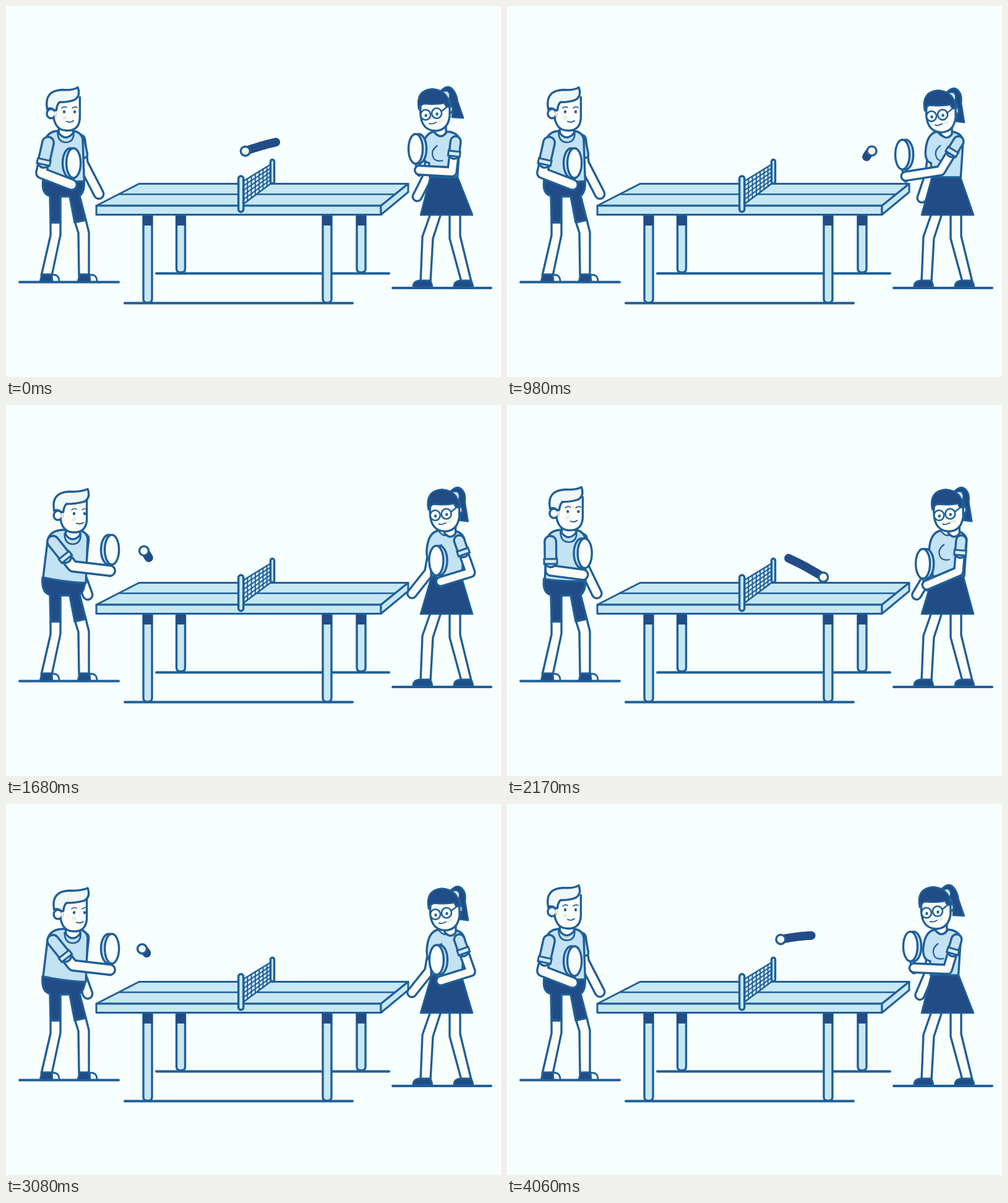
Animation, 800 px wide and 600 px high, one loop 4130 ms. Source, as an HTML page with a canvas:

```html
<!DOCTYPE html>
<html lang="en">
<head>
<meta charset="utf-8">
<title>Table tennis</title>
<style>
  html, body { margin: 0; width: 100%; height: 100%; overflow: hidden; background: #f7fefe; }
  canvas { display: block; width: 800px; height: 600px; }
</style>
</head>
<body>
<canvas id="stage" width="800" height="600"></canvas>
<script>
const ctx = document.getElementById('stage').getContext('2d');
const LOOP = 4130, STEP = 70, RALLY = LOOP / 3;
const BG = '#f7fefe', INK = '#1f5f98', DARK = '#214c86', SHIRT = '#c3e2f3', TABLE = '#c7e7f3',
      SKIN = '#fcfcf8', HAIR = '#eef8f6', WHITE = '#f8fefe', BALL = '#fff9ee';
const LINE = 3.4;

// A stroke goes from rest to strike, holds, then comes back; sway bends the way back.
const MAN = {
  begin: 0, out: 303, hold: 127, back: 550, sway: 0,
  rest: { elbow: [57, 270], hand: [106, 289], paddle: [107, 254], far: [150, 304], lean: 2 },
  strike: { elbow: [108, 261], hand: [168, 268], paddle: [169, 234], far: [132, 307], lean: 18 }
};
const GIRL = {
  begin: 593, out: 480, hold: 0, back: 640, sway: 9.5,
  rest: { elbow: [751, 271], hand: [703, 286], paddle: [698, 252], far: [656, 305], lean: 15 },
  strike: { elbow: [695, 266], hand: [638, 270], paddle: [635, 235], far: [672, 311], lean: 3 }
};
const HITS = [{ at: 430, x: 182 }, { at: 1073, x: 628 }];
const HIT_Y = 233, BOUNCE_Y = 300;

const mod = (a, n) => ((a % n) + n) % n;
const clamp = v => Math.max(0, Math.min(1, v));
const ease = u => u * u * (3 - 2 * u);
const mix = (a, b, u) => a + (b - a) * u;
const mixPoint = (a, b, u) => [mix(a[0], b[0], u), mix(a[1], b[1], u)];

function pose(player, time) {
  const { begin, out, hold, back, sway, rest, strike } = player;
  const t = mod(time - begin, RALLY), returning = t > out + hold;
  const w = returning ? 1 - ease(clamp((t - out - hold) / back)) : ease(clamp(t / out));
  const arc = Math.sin(Math.PI * w) * (returning ? 1 : -1);
  const raised = key => {
    const [x, y] = mixPoint(rest[key], strike[key], w);
    return [x, y - 12 * arc];
  };
  return {
    elbow: mixPoint(rest.elbow, strike.elbow, w),
    hand: raised('hand'),
    paddle: raised('paddle'),
    far: mixPoint(rest.far, strike.far, w),
    lean: mix(rest.lean, strike.lean, w) - sway * arc
  };
}

// One arc to the bounce, then a rebound that hovers before the next hit
function flight(time) {
  const phase = mod(time - HITS[0].at, RALLY), gap = HITS[1].at - HITS[0].at;
  const right = phase < gap;
  const [from, to] = right ? HITS : [HITS[1], HITS[0]];
  const since = right ? phase : phase - gap;
  const u = since / (right ? gap : RALLY - gap), cut = 0.62;
  const bounceX = mix(from.x, to.x, 0.81);
  if (u < cut) {
    const v = u / cut;
    return { since, spot: [mix(from.x, bounceX, v), mix(HIT_Y, BOUNCE_Y, v) - 194 * v * (1 - v)] };
  }
  const w = (u - cut) / (1 - cut), d = w - 0.5;
  return {
    since,
    spot: [mix(bounceX, to.x, 0.5 + 0.35 * d + 2.6 * d ** 3), mix(HIT_Y, BOUNCE_Y, (1 - w) ** 4)]
  };
}

function shape(d, fill, width = LINE) {
  const p = new Path2D(d);
  if (fill) { ctx.fillStyle = fill; ctx.fill(p); }
  if (width) { ctx.lineWidth = width; ctx.strokeStyle = INK; ctx.stroke(p); }
}

function dot(x, y, rx, ry, fill, width = LINE) {
  ctx.beginPath();
  ctx.ellipse(x, y, rx, ry, 0, 0, 7);
  ctx.fillStyle = fill;
  ctx.fill();
  if (width) { ctx.lineWidth = width; ctx.strokeStyle = INK; ctx.stroke(); }
}

function line(points, width, color, cap = 'round') {
  ctx.beginPath();
  points.forEach(([x, y]) => ctx.lineTo(x, y));
  ctx.lineCap = cap;
  ctx.lineWidth = width;
  ctx.strokeStyle = color;
  ctx.stroke();
  ctx.lineCap = 'round';
}

function limb(points, width, fill) {
  line(points, width, INK);
  line(points, width - 2 * LINE, fill);
}

function arm(shoulder, elbow, hand, reach, width) {
  limb([shoulder, elbow, hand], width, SKIN);
  const dx = elbow[0] - shoulder[0], dy = elbow[1] - shoulder[1], len = Math.hypot(dx, dy);
  const ux = dx / len, uy = dy / len;
  const end = [shoulder[0] + ux * reach, shoulder[1] + uy * reach];
  limb([shoulder, end], width + 2, SHIRT);
  const cuff = k => [[end[0] - uy * k, end[1] + ux * k], [end[0] + uy * k, end[1] - ux * k]];
  line(cuff(width / 2 + 2), 11, INK, 'butt');
  line(cuff(width / 2 - 1), 5, '#d6ebf6', 'butt');
}

function paddle([x, y], hand, rim) {
  limb([[x, y + 20], [hand[0], hand[1] + 6]], 9, SHIRT);
  dot(x + rim, y, 12.5, 24, SHIRT);
  dot(x - rim * 0.7, y, 11.5, 24, WHITE);
}

function tableLeg(x, foot) {
  shape(`M${x} 338V${foot - 6}Q${x} ${foot} ${x + 7} ${foot}Q${x + 14} ${foot} ${x + 14} ${foot - 6}V338Z`, TABLE);
  ctx.fillStyle = DARK;
  ctx.fillRect(x - 1, 338, 16, 17);
}

function net() {
  const top = u => [mix(384, 428, u), mix(283, 256, u)];
  const bottom = u => [mix(384, 428, u), mix(320, 287, u)];
  shape('M384 283L428 256V287L384 320Z', '#d8eef6', 2.6);
  for (let i = 1; i < 7; i++) line([top(i / 7), bottom(i / 7)], 2, INK);
  for (let i = 1; i < 5; i++) line([0, 1].map(s => mixPoint(top(s), bottom(s), i / 5)), 2, INK);
  limb([[430.5, 251.5], [430.5, 284]], 9.5, TABLE);
  limb([[379.7, 279], [379.7, 329]], 11.5, TABLE);
}

function furniture() {
  const floor = (from, to, y) => line([[from, y], [to, y]], 4, INK);
  floor(22, 182, 446.5);
  floor(625, 784, 456);
  floor(243, 619, 432.5);
  floor(192, 560, 480.5);
  for (const x of [275.5, 567]) tableLeg(x, 431);
  for (const x of [222, 512]) tableLeg(x, 480);
  shape('M215 287.5H650L606 323H146Z', TABLE, 3);
  shape('M184 304.5H629', null, 2.6);
  shape('M146 323H606V337.5H146Z', TABLE, 3);
  shape('M650 287.5V301L606 337.5V323Z', TABLE, 3);
  net();
}

function manHead(lean) {
  const turn = lean * 0.3;
  ctx.save();
  ctx.translate(lean * 0.7, lean * 0.28);
  shape('M84 194V205Q95 219 107 205V194Z', SKIN);
  shape('M82 203Q82 220 96 220Q109 219 108 203', null, 2.6);
  shape('M118 147V176Q119 201 97 201Q72 201 75 160', SKIN);
  dot(71.5, 173.5, 7, 7.5, SKIN);
  shape('M77 167Q83 173 77 180Z', SKIN, 0);
  shape(`M65 165Q60 136 90 135Q107 136 ${114 + turn} 131Q${119 + turn} 145 ${109 + turn} 151Q100 155 85 155Q81 159 80 168Q76 169 74 166Q69 164 65 166Z`, HAIR);
  ctx.translate(turn, 0);
  for (const x of [92, 109]) {
    dot(x, 170.5, 2.2, 2.6, INK, 0);
    shape(`M${x - 4} 164.5Q${x} 161 ${x + 4} 163.5`, null, 1.7);
  }
  shape('M96 186Q102 189 107 185', null, 1.9);
  dot(92, 180, 4, 3, '#e0f3ea', 0);
  ctx.restore();
}

function man(time) {
  const { elbow, hand, paddle: bat, far, lean } = pose(MAN, time);
  const l = lean / 18;
  limb([[119 + 7 * l, 216], [125 - 5 * l, 252 + 22 * l], far], 19, SKIN);
  limb([[120 + 6 * l, 216], [126 - 2 * l, 240]], 15, SHIRT);
  shape('M72 350V371L57 436H74L88 370V350Z', SKIN);
  shape('M111 348L117 367L118 436H134L134 366L129 346Z', SKIN);
  for (const x of [54, 115]) {
    shape(`M${x + 20} 435Q${x + 32} 433 ${x + 32} 446H${x + 18}Z`, SKIN, 2.8);
    shape(`M${x + 1} 446L${x + 4} 434H${x + 20}L${x + 21} 446Z`, DARK, 2.8);
  }
  shape(`M${60 - l} ${282 - 3 * l}Q57 304 71 307L72 350H88V308H103L111 350L129 346L119 307Q127 301 ${126 + 2 * l} 284Z`, DARK);
  shape(`M${62 - 2 * l} ${283 - 4 * l}L${62 + 5 * l} 221Q${64 + 5 * l} 204 ${82 + 8 * l} 202H${108 + 8 * l}Q${121 + 9 * l} 204 ${123 + 9 * l} 216L${126 + 3 * l} ${283 + 5 * l}Q90 286 ${62 - 2 * l} ${283 - 4 * l}Z`, SHIRT);
  manHead(lean);
  paddle(bat, hand, -3);
  arm([67 + 9 * l, 221], elbow, hand, 32, 20);
}

function girlHead(lean) {
  const l = lean / 15, sway = 8 * clamp(4 * l);
  ctx.save();
  ctx.translate(lean, 2.5 * clamp(l * 2));
  shape(`M703 138Q714 126 722 134Q729 141 ${731 - sway * 0.5} 155L${740 - sway} ${181 + sway * 0.6}L${722 - sway * 0.4} ${180 + sway * 0.5}Q724 158 714 145Z`, DARK, 2.6);
  shape('M705 139Q716 134 718 143Q719 151 712 155Z', SHIRT, 2);
  shape('M694 192V205Q704 216 712 205V192Z', SKIN);
  dot(718, 167, 5, 6, SKIN);
  shape('M671 160Q667 201 695 202Q715 201 718 178V158', SKIN);
  shape('M668 167Q662 136 690 134Q716 136 718 163Q711 165 710 157Q695 160 676 158Q671 160 668 167Z', DARK, 2.6);
  for (const [x, y] of [[679, 176], [697, 173.5]]) {
    dot(x, y, 8, 8.3, WHITE, 2.6);
    dot(x + 0.5, y + 1, 2.2, 2.5, INK, 0);
  }
  shape('M705 170L715 162', null, 2.4);
  shape('M685 190Q690 192 696 188', null, 1.9);
  dot(702, 186, 4, 3, '#e0f3ea', 0);
  ctx.restore();
}

function girl(time) {
  const { elbow, hand, paddle: bat, far, lean } = pose(GIRL, time);
  const s = 7 * lean / 15;
  limb([[686 + s, 218], [684, 270], far], 18, SKIN);
  shape('M686 336L673 373L670 446H686L690 376L703 336Z', SKIN);
  shape('M717 336V376L736 446H752L734 372V336Z', SKIN);
  for (const x of [657, 723]) {
    shape(`M${x + 1} 455Q${x} 445 ${x + 12} 444H${x + 28}Q${x + 31} 447 ${x + 32} 455Z`, DARK, 2.8);
  }
  shape(`M${686 + s * 0.3} 276H${730 + s * 0.8}L754 338H670Z`, DARK, 2.6);
  shape(`M${685 + s * 0.3} 277L${684 + s * 0.4} 254Q${673 + s} 252 ${673 + s} 236Q${675 + s} 205 ${693 + s} 203H${713 + s}Q${730 + s} 204 ${734 + s} 217L${730 + s} 277Z`, SHIRT);
  shape(`M${697 + s} 226Q${685 + s} 235 ${692 + s} 247Q${697 + s} 252 ${706 + s} 250`, null, 2.2);
  shape(`M${692 + s} 203Q${703 + s} 219 ${714 + s} 203`, SKIN, 2.6);
  girlHead(lean);
  paddle(bat, hand, 3);
  arm([727 + s * 0.8, 219], elbow, hand, 20, 18);
}

function ball(time) {
  const { since, spot } = flight(time);
  const span = Math.min(62, since);
  const trail = [];
  for (let i = 0; i <= 10; i++) trail.push(flight(time - span * i / 10).spot);
  if (span > 2) line(trail, 14, DARK);
  dot(...spot, 7.5, 7.5, BALL);
}

function draw(now) {
  const time = Math.floor(mod(now, LOOP) / STEP) * STEP;
  ctx.lineJoin = 'round';
  ctx.fillStyle = BG;
  ctx.fillRect(0, 0, 800, 600);
  furniture();
  man(time);
  girl(time);
  ball(time);
}

let start;
function tick(now) {
  start ??= now;
  draw(now - start);
  requestAnimationFrame(tick);
}
draw(0);
requestAnimationFrame(tick);
</script>
</body>
</html>
```
